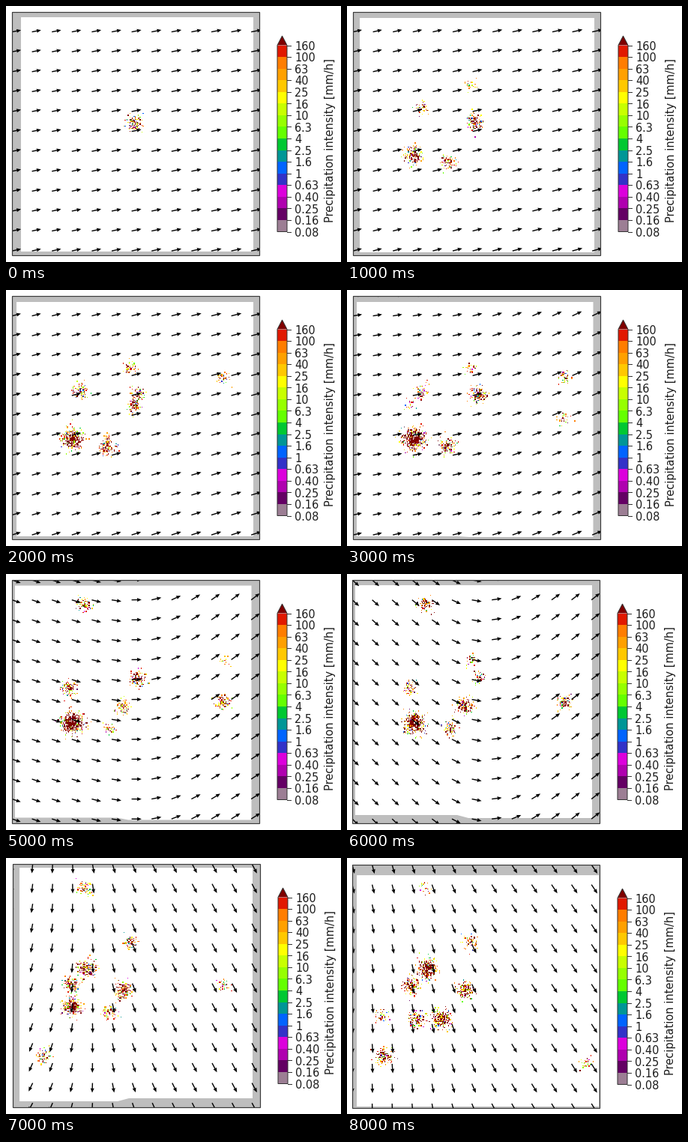
A matplotlib script for the animation above (9 s loop, 447x342 px).

```python
import numpy as np
import matplotlib.pyplot as plt
from matplotlib.animation import FuncAnimation
from matplotlib.colors import to_rgba_array
from matplotlib.patches import Polygon, Rectangle

W, H, DPI = 447, 342, 64
PT = 72 / DPI        # points per pixel
FRAMES = 9
MAP_W, MAP_H = 330, 325
STEP = 26.6          # arrow spacing
CELL = STEP / 20

COLORS = ['#9c7e94', '#640064', '#af00af', '#dc00dc', '#3232c8', '#0064ff',
          '#009696', '#00c832', '#64ff00', '#96ff00', '#c8ff00', '#ffff00',
          '#ffc800', '#ffa000', '#ff7d00', '#e11900']
OVER = '#7f0000'
LEVELS = ['0.08', '0.16', '0.25', '0.40', '0.63', '1', '1.6', '2.5', '4',
          '6.3', '10', '16', '25', '40', '63', '100', '160']
RGBA = to_rgba_array(COLORS + [OVER])
WEIGHTS = .13 + np.linspace(0, 1, 16) ** 3
WEIGHTS /= WEIGHTS.sum()

# Key values in time; everything between them is interpolated.
TIMES = [0, 2, 4, 6, 7, 8]
KEYS = dict(
    dx=[0, 0, 1, -1, 1, -1],
    dy=[0, 0, 1, 0, 0, 1],
    # wind angle on either side of a front, at the top and bottom
    west_top=[11, 14, 4, -42, -97, -76],
    west_low=[12, 17, 8, -45, -121, -90],
    east_top=[11, 14, 38, 39, -62, -56],
    east_low=[12, 18, 27, 39, -62, -58],
    front=[.55, .55, .56, .52, .33, .4],
    # width of the grey area without data
    left=[12, 6, 4, 4, 9, 6],
    right=[8, 8, 11, 10, 10, 1],
    top=[7, 8, 8, 7, 5, 14],
    bottom=[5, 4, 4, 11, 8, 2],
    rise=[0, 0, -2, -4, 4, 0],
)

# x, y, birth, death, peak number of cells
STORMS = [
    (171, 155, -1.2, 2.8, 125), (176, 139, 1.5, 6.3, 140),
    (157, 177, 4.6, 9.6, 170), (89, 199, .5, 7.9, 430),
    (100, 136, .7, 3.4, 90), (84, 152, 2.9, 6.5, 110),
    (86, 169, 6.2, 9.2, 140), (108, 148, 6.5, 9.5, 270),
    (135, 208, .5, 4.2, 130), (139, 206, 4.7, 7.9, 80),
    (93, 215, 7.2, 8.8, 120), (126, 216, 7.2, 8.8, 230),
    (165, 104, .7, 3.4, 50), (166, 113, 5.3, 10, 65),
    (105, 40, 3.8, 8.2, 85), (290, 117, 1.2, 5.2, 50),
    (290, 171, 2.8, 7.3, 100), (49, 265, 6.7, 9.5, 130),
    (47, 211, 7.3, 8.7, 45), (320, 273, 7.4, 8.6, 30),
]

fig = plt.figure(figsize=(W / DPI, H / DPI), dpi=DPI, facecolor='white')
ax = fig.add_axes([0, 0, 1, 1])


def draw_ground(k, x0, y0):
    ax.add_patch(Rectangle((x0, y0), MAP_W, MAP_H, fc='#bebebe', ec='none'))
    left, right = x0 + k['left'], x0 + MAP_W - k['right']
    top, low = y0 + k['top'], y0 + MAP_H - k['bottom']
    end = low - k['rise']
    ax.add_patch(Polygon([(left, top), (right, top), (right, end),
                          (x0 + 155, end), (x0 + 140, low), (left, low)],
                         fc='white', ec='none'))


def draw_rain(t, x0, y0):
    rng = np.random.default_rng(40 + t)
    nx, ny = int(MAP_W / CELL), int(MAP_H / CELL)
    img = np.zeros((ny, nx, 4))
    for x, y, birth, death, peak in STORMS:
        if not birth < t < death:
            continue
        n = int(peak * np.sin(np.pi * (t - birth) / (death - birth)) ** .7)
        r = 3 + np.sqrt(n) / 4.5
        px, py = rng.normal(size=(2, n))
        heat = .15 * n / r ** 2 * np.exp(-(px ** 2 + py ** 2) / 4)
        color = np.where(rng.random(n) < heat, 16,
                         rng.choice(16, n, p=WEIGHTS))
        col = ((x + r * px - x0) / CELL).astype(int).clip(0, nx - 1)
        row = ((y + r * py - y0) / CELL).astype(int).clip(0, ny - 1)
        img[row, col] = RGBA[color]
    ax.imshow(img, extent=(x0, x0 + MAP_W, y0 + MAP_H, y0),
              interpolation='nearest', aspect='auto', zorder=2)


def draw_wind(k, x0, y0, clip):
    u, v = np.meshgrid(np.arange(13) * STEP / MAP_W, np.linspace(0, 1, 13))
    west = k['west_top'] + (k['west_low'] - k['west_top']) * v
    east = k['east_top'] + (k['east_low'] - k['east_top']) * v
    side = .5 + .5 * np.tanh((u - k['front']) / .18)
    ang = np.radians(west + (east - west) * side)
    size = 12.3 + 2 * u
    q = ax.quiver(x0 + u * MAP_W, y0 + v * 12 * STEP,
                  size * np.cos(ang), -size * np.sin(ang),
                  angles='xy', scale_units='xy', scale=1, units='dots',
                  width=1.4, headwidth=3.6, headlength=4.3,
                  headaxislength=4, color='black', zorder=3)
    q.set_clip_path(clip)


def draw_colorbar(dx, dy):
    left, right, top, low = 362 + dx, 375 + dx, 52.5 + dy, 301.5 + dy
    seg = (low - top) / 16
    for i, c in enumerate(COLORS):
        ax.add_patch(Rectangle((left, low - (i + 1) * seg), right - left, seg,
                               fc=c, ec='none'))
    tip = [(left, top), ((left + right) / 2, top - 12.5), (right, top)]
    ax.add_patch(Polygon(tip, fc=OVER, ec='none'))
    ax.add_patch(Polygon([(left, low), *tip, (right, low)], fc='none',
                         ec='#333333', lw=PT))
    for i, label in enumerate(LEVELS):
        y = low - i * seg
        ax.plot([right, right + 5], [y, y], color='#333333', lw=PT)
        ax.text(right + 10, y + 6.2, label, fontsize=14.5 * PT,
                color='#1c1c1c')
    ax.text(432.5 + dx, 179.5 + dy, 'Precipitation intensity [mm/h]',
            fontsize=14.6 * PT, rotation=90, ha='center', va='center',
            color='#1c1c1c')


def draw(t):
    k = {name: np.interp(t, TIMES, vals) for name, vals in KEYS.items()}
    dx, dy = round(k['dx']), round(k['dy'])
    x0, y0 = 8 + dx, 8 + dy
    ax.clear()
    draw_ground(k, x0, y0)
    draw_rain(t, x0, y0)
    border = ax.add_patch(Rectangle((x0, y0), MAP_W, MAP_H, fc='none',
                                    ec='#3a3a3a', lw=1.2 * PT, zorder=4))
    draw_colorbar(dx, dy)
    ax.set(xlim=(0, W), ylim=(H, 0))
    ax.axis('off')
    draw_wind(k, x0, y0, border)


anim = FuncAnimation(fig, draw, frames=FRAMES, init_func=lambda: None,
                     interval=1000, repeat=True, cache_frame_data=False)
plt.show()
```
